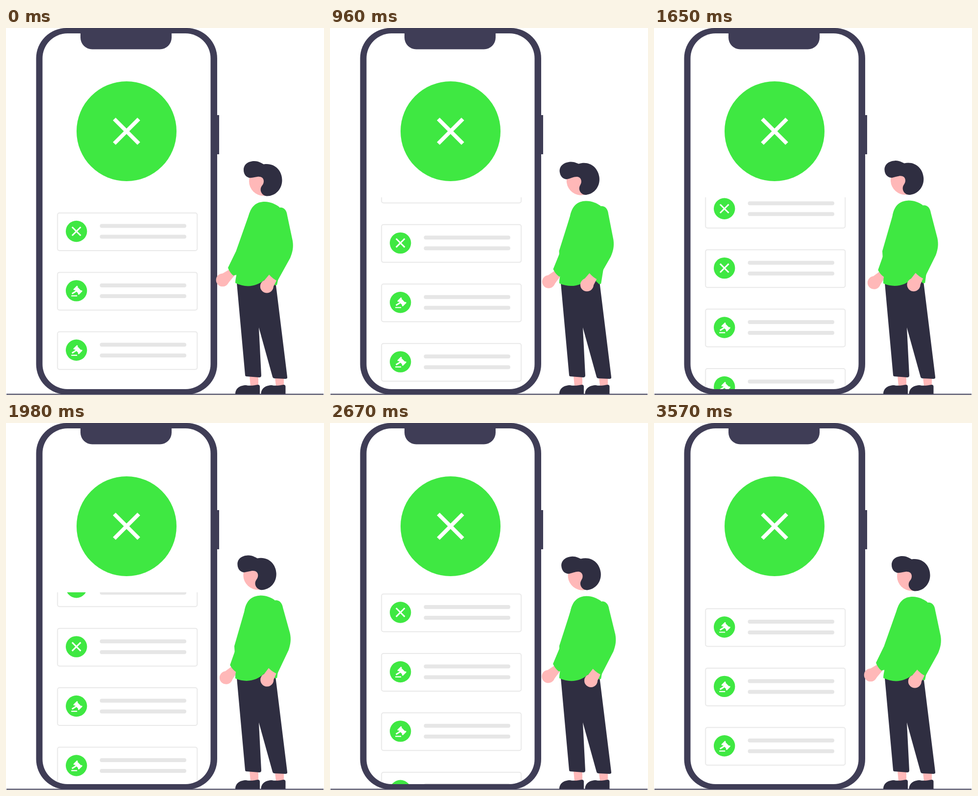
An HTML page with a canvas that plays this animation: 649 by 750 pixels, repeating every 3600 ms.

```html
<!DOCTYPE html>
<html lang="en">
<head>
<meta charset="utf-8">
<title>Phone list</title>
<style>
  html, body { margin: 0; width: 100%; height: 100%; overflow: hidden; background: #fff; }
  canvas { display: block; }
</style>
</head>
<body>
<canvas id="stage" width="649" height="750"></canvas>
<script>
const ctx = document.getElementById('stage').getContext('2d');
const GREEN = '#3fe842', FRAME = '#3f3d56', DARK = '#2f2e41', SKIN = '#ffb8b8', GREY = '#e6e6e6', WHITE = '#fff';
const LOOP = 3600, STEP = 30;
const PITCH = 121.4, SPEED = 0.1016;

// Times at which each card's icon turns into a cross.
const CROSS_AT = [0, 930, 1650];

// Keyframes as [ms, value], joined with a sine ease.
const LEAN = [[0, 0], [1700, 1], [2050, 1], [3300, 0], [LOOP, 0]];
const NOD = [[0, 0], [950, -6], [1950, 1.5], [3100, -6.8], [3550, 0], [LOOP, 0]];
const SWING = [[0, 0], [1150, 3.2], [1950, 0], [LOOP, 0]];

const shapes = {
  hair: 'M485 290C485 278 495 272 507 272C517 272 522 277 526 278.5C548 275 563.5 291 563.5 311C563.5 330 549 344 532 343.5C524 343 518 335 520 327C522 321 526 320 526 313C526 306 520 303 513 304C505 305 500 307 496 306C489 304 485 298 485 290Z',
  torso: 'M495 385C500 363 512 355 528 355C540 355 550 360 558 366L570 440L553 525L549 526C541 516 533 513 527 515C512 528 490 532 468 521C468 515 469 512 470 506L470 455Z',
  rearSleeve: 'M545 375C556 362 572 364 574 383L585 435C587 448 585 458 580 470L554 517Q545 513 537 504L548 460Z',
  rearWrist: 'M538 503L553 514L543 534L527 516Z',
  frontSleeve: 'M497 378L470 455L453 490C455 496 459 502 464 506L475 503L510 440Z',
  frontWrist: 'M455 494L467 505L452 523L438 504Z',
  legs: 'M470 510L488 709Q488 712 491 712L517 714Q521 714 521 710L516 612L544 713Q545 716 548 716L570 717Q575 717 574 713L549 510Z',
  ankles: 'M497 711H515V732H499ZM549 715H567V732H551Z',
  shoe: 'M468 748C468 736 478 730 490 730C498 732 508 730 514 729Q518 729 518 733V748Z'
};
for (const name in shapes) shapes[name] = new Path2D(shapes[name]);

function fill(name, color) {
  ctx.fillStyle = color;
  ctx.fill(shapes[name]);
}

function circle(x, y, r, color) {
  ctx.fillStyle = color;
  ctx.beginPath();
  ctx.arc(x, y, r, 0, Math.PI * 2);
  ctx.fill();
}

function box(x, y, w, h, radii, color) {
  ctx.fillStyle = color;
  ctx.beginPath();
  ctx.roundRect(x, y, w, h, radii);
  ctx.fill();
}

function line(x1, y1, x2, y2, width, color) {
  ctx.strokeStyle = color;
  ctx.lineWidth = width;
  ctx.beginPath();
  ctx.moveTo(x1, y1);
  ctx.lineTo(x2, y2);
  ctx.stroke();
}

function cross(x, y, r, width) {
  line(x - r, y - r, x + r, y + r, width, WHITE);
  line(x - r, y + r, x + r, y - r, width, WHITE);
}

function rotated(x, y, degrees, draw) {
  ctx.save();
  ctx.translate(x, y);
  ctx.rotate(degrees * Math.PI / 180);
  ctx.translate(-x, -y);
  draw();
  ctx.restore();
}

function valueAt(keys, t) {
  const i = keys.findIndex(key => key[0] > t);
  const [t0, a] = keys[i - 1], [t1, b] = keys[i];
  return a + (b - a) * (1 - Math.cos(Math.PI * (t - t0) / (t1 - t0))) / 2;
}

function gavel(x, y) {
  rotated(x + 3, y - 1, 45, () => {
    box(x - 4, y - 5, 14, 8, 0, WHITE);
    box(x - 5, y - 6.5, 3, 11, 1, WHITE);
    box(x + 8, y - 6.5, 3, 11, 1, WHITE);
  });
  line(x + 2, y - 1, x - 9, y + 6, 3, WHITE);
  line(x - 10.5, y + 10.5, x + 1.5, y + 10.5, 2.2, WHITE);
}

function card(y, crossed) {
  ctx.strokeStyle = '#e9e9e9';
  ctx.lineWidth = 2;
  ctx.beginPath();
  ctx.roundRect(105.2, y, 285, 77, 4);
  ctx.stroke();
  circle(143.7, y + 37.5, 21.7, GREEN);
  if (crossed) cross(143.7, y + 37.5, 8.8, 3);
  else gavel(143.7, y + 37.5);
  box(191.5, y + 22.5, 176.5, 8, 4, GREY);
  box(191.5, y + 44.5, 176.5, 8, 4, GREY);
}

function phone(t) {
  box(430, 178, 5, 80, 0, FRAME);
  box(61.5, 0, 369.5, 749, 62, FRAME);
  box(74.5, 11, 343, 727, 51, WHITE);
  box(152, 0, 186, 43.5, [0, 0, 24, 24], FRAME);
  circle(246, 211, 102, GREEN);
  cross(246, 211, 25, 8);

  ctx.save();
  ctx.beginPath();
  ctx.roundRect(74.5, 11, 343, 727, 51);
  ctx.clip();
  ctx.beginPath();
  ctx.rect(74, 346, 344, 393);
  ctx.clip();
  for (let i = 0; i < 7; i++) {
    const y = 378 + i * PITCH - t * SPEED;
    if (y > 260 && y < 740) card(y, t >= CROSS_AT[i]);
  }
  ctx.restore();
}

function person(t) {
  const lean = valueAt(LEAN, t);
  fill('ankles', SKIN);
  fill('shoe', DARK);
  ctx.save();
  ctx.translate(52.5, 0);
  fill('shoe', DARK);
  ctx.restore();
  fill('legs', DARK);

  rotated(485, 520, -3.6 * lean, () => {
    rotated(522, 365, valueAt(NOD, t), () => {
      circle(526, 313, 30, SKIN);
      fill('hair', DARK);
    });
    rotated(510, 375, -2.9 * lean, () => {
      fill('frontWrist', SKIN);
      circle(442, 515, 13.3, SKIN);
      fill('frontSleeve', GREEN);
    });
    fill('torso', GREEN);
    rotated(560, 372, valueAt(SWING, t), () => {
      fill('rearWrist', SKIN);
      circle(532.3, 528, 13.5, SKIN);
      fill('rearSleeve', GREEN);
    });
  });
}

function render(now) {
  const t = Math.floor(now % LOOP / STEP) * STEP;
  ctx.fillStyle = WHITE;
  ctx.fillRect(0, 0, 649, 750);
  phone(t);
  person(t);
  line(1, 748.5, 648, 748.5, 2, FRAME);
}

let start;
function tick(now) {
  start ??= now;
  render(now - start);
  requestAnimationFrame(tick);
}
requestAnimationFrame(tick);
</script>
</body>
</html>
```
